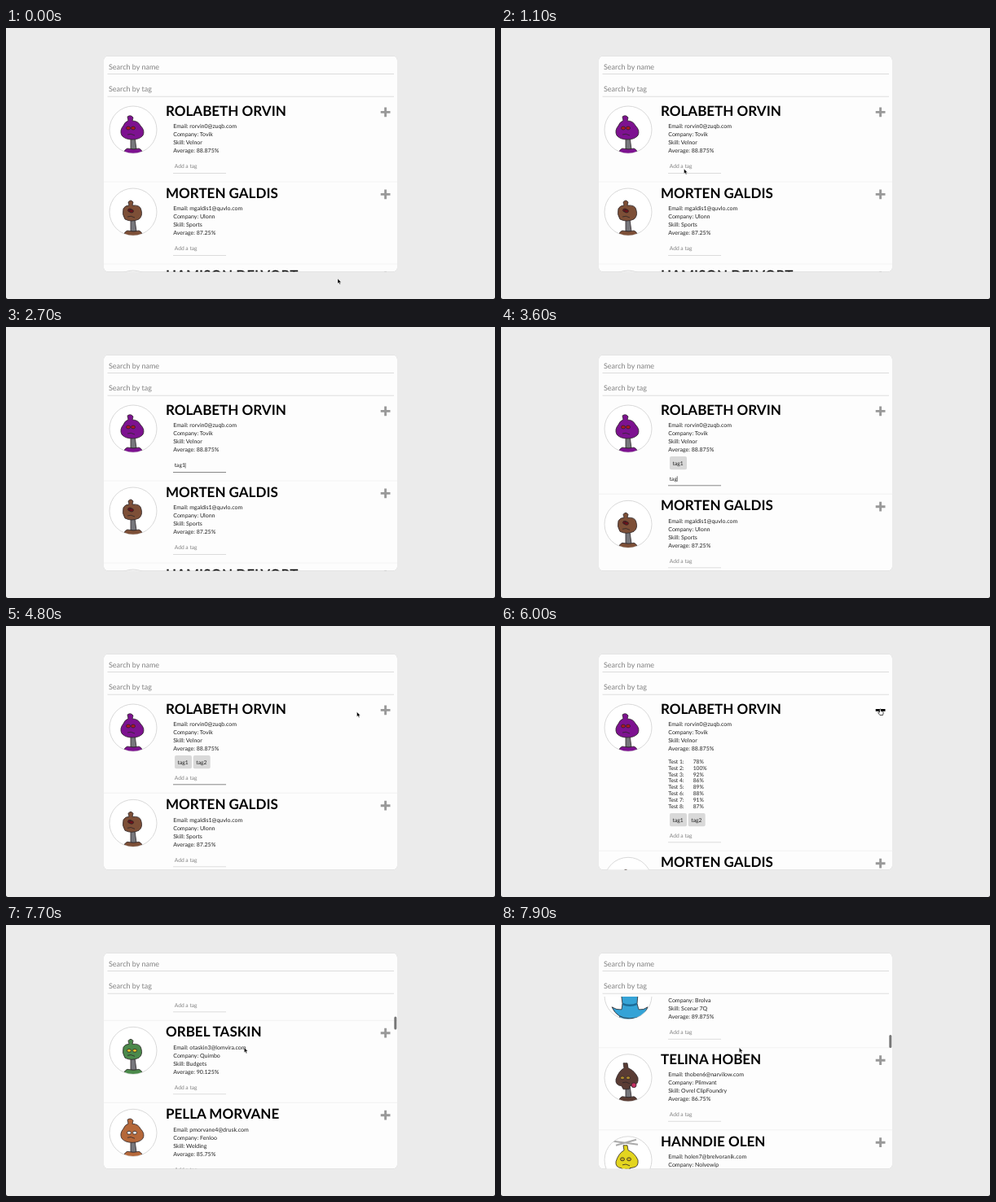
An HTML page that plays this animation: 600 px wide and 333 px high, repeating every 8 s.

```html
<!DOCTYPE html>
<html lang="en">
<head>
<meta charset="utf-8">
<title>Student list</title>
<style>
html, body { margin: 0; width: 100%; height: 100%; overflow: hidden; background: #ebebeb; }
svg { display: block; width: 600px; height: 333px; font: 7px Lato, sans-serif; text-rendering: geometricPrecision; }
.search { font-size: 9px; fill: #808080; }
.name { font-size: 17px; font-weight: 700; fill: #000; }
.info { fill: #222; }
.small { font-size: 6.7px; }
.hint { fill: #858585; }
.rule { stroke: #cecece; stroke-width: .7; }
.panel { filter: drop-shadow(0 .8px .6px #0004); }
</style>
</head>
<body>
<svg viewBox="0 0 600 333">
  <defs>
    <clipPath id="view"><path d="M120 88H480V294.500Q480 299.500 475 299.500H125Q120 299.500 120 294.500Z"/></clipPath>
    <clipPath id="round"><circle r="28.700"/></clipPath>
  </defs>
  <rect class="panel" x="120" y="34.500" width="360" height="265" rx="5" fill="#fdfdfd"/>
  <text class="search" x="126" y="50.500">Search by name</text>
  <path class="rule" d="M124.500 56.500H476M124.500 84.200H476"/>
  <text class="search" x="126" y="77.500">Search by tag</text>
  <g clip-path="url(#view)"><g id="list"></g></g>
  <rect id="bar" x="476.300" width="3" height="16" rx="1.500" fill="#777"/>
  <path d="M0 330.500Q0 333 2.500 333H0ZM600 330.500Q600 333 597.500 333H600Z"/>
  <path id="arrow" d="M0 0V6L1.400 4.800L2.400 7L3.400 6.500L2.500 4.400H4.300Z" stroke="#fff" stroke-width=".4"/>
  <path id="hand" d="M-1 -2Q0 -3 .7 -2V0L3 .7Q4 1 3.600 2.500L3 5H-.6L-2.800 2Q-3 .6 -1 1.600Z" fill="#fff" stroke="#000" stroke-width=".7"/>
</svg>
<script>
const PITCH = 101, TAG_SHIFT = 16.3, OPEN_SHIFT = 71, STEP = 100;
const $ = id => document.getElementById(id);
const show = (el, on) => el.setAttribute('visibility', on ? 'visible' : 'hidden');
const move = (el, x, y) => el.setAttribute('transform', `translate(${x} ${y})`);
const text = (x, y, s, cls = 'info') => `<text class="${cls}" x="${x}" y="${y}">${s}</text>`;

const people = [
  'ROLABETH ORVIN|rorvin0@zuqb.com|Tovik|Velnor|88.875',
  'MORTEN GALDIS|mgaldis1@quvlo.com|Ulonn|Sports|87.25',
  'HAMISON DELVORT|hdelvort2@pervuno.com|Zandlo|Gardening|84.5',
  'ORBEL TASKIN|otaskin3@lomvira.com|Quimbo|Budgets|90.125',
  'PELLA MORVANE|pmorvane4@drusk.com|Fenloo|Welding|85.75',
  'DARVIN KOLPE|dkolpe5@wembrin.com|Brolva|Scenar 7Q|89.875',
  'TELINA HOBEN|thoben6@narvilow.com|Plimvant|Ovrel ClipFoundry|86.75',
  'HANNDIE OLEN|holen7@brelvoranik.com|Nolvewip|Sketching|88.25'
].map(s => s.split('|'));
const scores = [78, 100, 92, 86, 89, 88, 91, 87];

// Avatars: colour, head outline, eye colour, eye positions
const drop = 'M-7-16Q-3-19 0-15L-1-11Q6-11 9-5Q15 1 12 7Q8 12-1 12Q-10 12-14 7Q-17 1-12-5Q-10-10-6-11Z';
const pot = 'M-6-12Q-3-16 0-12L-1-8Q9-9 10-2Q12 5 7 9Q-2 13-10 9Q-14 3-12-4Q-10-8-5-8Z';
const dome = 'M-6-18L-1-18L0-12Q8-9 12 0Q13 8 7 9L2 10L1 14H-6L-8 10Q-16 9-15 2Q-12-8-5-12Z';
const hat = 'M-10-14H13L11 10L13 17Q19 18 24 14Q20 28 2 28Q-14 28-20 14Q-14 18-8 17L-7 10Z';
const looks = [
  ['#7d1290', drop, '#b3161f', [[-6, -2], [0, -2]]],
  ['#7d4f37', pot, '#6e1219', [[-4, -2], [-2, -1]]],
  ['#778', dome, '#ddd', [[-7, 0], [0, 0]]],
  ['#4b8a4b', pot, '#e4c42c', [[-5, 0], [2, 0]]],
  ['#b5683a', drop, '#eee', [[-5, 0], [2, 0]]],
  ['#35a3d6', hat, '#174b70', []],
  ['#5a3c34', dome, '#b08a2c', [[-7, 0], [0, 0]]],
  ['#e3d51f', dome, '#c9b01c', [[-7, -1], [1, -1]]]
];

function avatar(i) {
  const [fill, head, eye, eyes] = looks[i];
  const extra = i == 6 ? '<circle cx="7" cy="9" r="3" fill="#c43162"/>'
    : i == 7 ? '<path d="M-18-23L12-19M-15-18L10-25" stroke="#aaa" stroke-width="2"/>' : '';
  const face = eyes.length ? '<path d="M-7 6Q-3 4 2 7" fill="none"/>'
    : '<path d="M-7 10Q2 14 11 10" fill="none" stroke="#1b6a96" stroke-width="2.500"/>';
  return `<g transform="translate(156 125)"><circle r="29" fill="#fff" stroke="#c9c9c9" stroke-width=".7"/>
    <g clip-path="url(#round)" stroke="#2c2528" stroke-width=".8">
      <path d="M-3 9L2 9L4 24H-3Z" fill="#77777c"/>
      <path d="M-11 30Q-12 25-7 23Q1 25 7 23Q12 25 11 30Z" fill="${fill}"/>
      <path d="${head}" fill="${fill}"/>${face}
      ${eyes.map(([x, y]) => `<ellipse cx="${x}" cy="${y}" rx="2.500" ry="2" fill="${eye}"/>`).join('')}${extra}
    </g></g>`;
}

function card([name, mail, firm, skill, mean], i) {
  const lines = ['Email: ' + mail, 'Company: ' + firm, 'Skill: ' + skill, `Average: ${mean}%`];
  return `<g class="card">${avatar(i)}${text(196, 108.2, name, 'name')}
    ${lines.map((s, k) => text(205.3, 123.4 + k * 10, s)).join('')}
    <path class="sign" d="M459.700 103.400H471.500M465.600 97.500V109.300" stroke="#999" stroke-width="2.900"/>
    <g class="entry">${text(206.7, 172.4, 'Add a tag', 'small hint')}
      <path class="rule" d="M205 178.500H270"/>
      <path d="M120 189H480" stroke="#eee" stroke-width=".7"/></g></g>`;
}

$('list').innerHTML = people.map(card).join('');
const cards = [...document.querySelectorAll('.card')];
const find = sel => cards[0].querySelector(sel);
const entry = find('.entry'), hint = find('.hint'), rule = find('.rule'), sign = find('.sign');
const tag = k => `<g class="tag"><rect x="${207 + k * 22.7}" y="159" width="21" height="16.300" rx="2" fill="#d9d9d9"/>
  ${text(210.6 + k * 22.7, 169.5, 'tag' + (k + 1), 'info small')}</g>`;
entry.insertAdjacentHTML('beforebegin',
  `<g id="tests">${scores.map((n, k) => text(205.3, 168.8 + k * 7.86, `Test ${k + 1}:`, 'info small')
    + text(235.7, 168.8 + k * 7.86, n + '%', 'info small')).join('')}</g><g id="tags">${tag(0) + tag(1)}</g>`);
entry.insertAdjacentHTML('beforeend', '<path id="caret" d="M0 167V173.500" stroke="#222" stroke-width=".6"/>');
const tags = document.querySelectorAll('.tag');

// Linear interpolation through rows of [time, ...values]
function track(rows, t) {
  let i = 1;
  while (i < rows.length - 1 && t > rows[i][0]) i++;
  const a = rows[i - 1], b = rows[i];
  const p = Math.min(1, Math.max(0, (t - a[0]) / (b[0] - a[0])));
  return a.slice(1).map((v, k) => v + (b[k + 1] - v) * p);
}
const pointer = [[0, 407, 308], [500, 300, 218], [800, 229, 176], [1000, 224.5, 173], [4200, 224.5, 173],
  [4500, 300, 140], [4800, 430.5, 105.5], [4900, 444, 101.5], [5000, 462, 103], [5100, 465.5, 104.5],
  [6500, 465.5, 104.5], [6700, 390, 125], [6900, 305, 148], [7000, 292.3, 150.7]];
const scrolling = [[7400, 0], [7500, 30], [7600, 135], [7700, 290], [7800, 440], [7900, 559.5]];

function typed(t) {
  const [keys, word] = t < 2900 ? [[2200, 2300, 2400, 2600], 'tag1']
    : t < 4100 ? [[3300, 3400, 3500, 3800], 'tag2'] : [[], ''];
  return word.slice(0, keys.filter(k => t >= k).length);
}

function draw() {
  const t = Math.floor(performance.now() % 8000 / STEP) * STEP;
  const open = t >= 5300 && t < 6400, hover = t >= 5000 && t < 6600, focus = t >= 1500 && t < 5300;
  const count = (t >= 2900) + (t >= 4100), down = open ? OPEN_SHIFT : 0;
  const shift = down + (count ? TAG_SHIFT : 0), word = typed(t);
  const [scroll] = track(scrolling, t), [x, y] = track(pointer, t);

  cards.forEach((c, i) => move(c, 0, i * PITCH + (i && shift)));
  move($('list'), 0, -scroll);
  move(entry, 0, shift);
  move($('tags'), 0, down);
  tags.forEach((g, k) => show(g, k < count));
  show($('tests'), open);

  hint.textContent = word || 'Add a tag';
  hint.style.fill = word ? '#222' : '';
  rule.style.stroke = focus ? '#555' : '';
  show($('caret'), focus && t < 4500);
  move($('caret'), word ? 207 + hint.getComputedTextLength() : 206.7, 0);

  sign.setAttribute('d', 'M459.700 103.400H471.500' + (open ? '' : 'M465.600 97.500V109.300'));
  sign.setAttribute('stroke', hover ? '#000' : '#999');
  show($('bar'), t >= 7500);
  $('bar').setAttribute('y', 88.5 + scroll * 0.083);

  show($('hand'), hover);
  show($('arrow'), !hover && (t < 2200 || t >= 4200));
  move($('hand'), x, y);
  move($('arrow'), x, y);
  requestAnimationFrame(draw);
}
draw();
</script>
</body>
</html>
```
